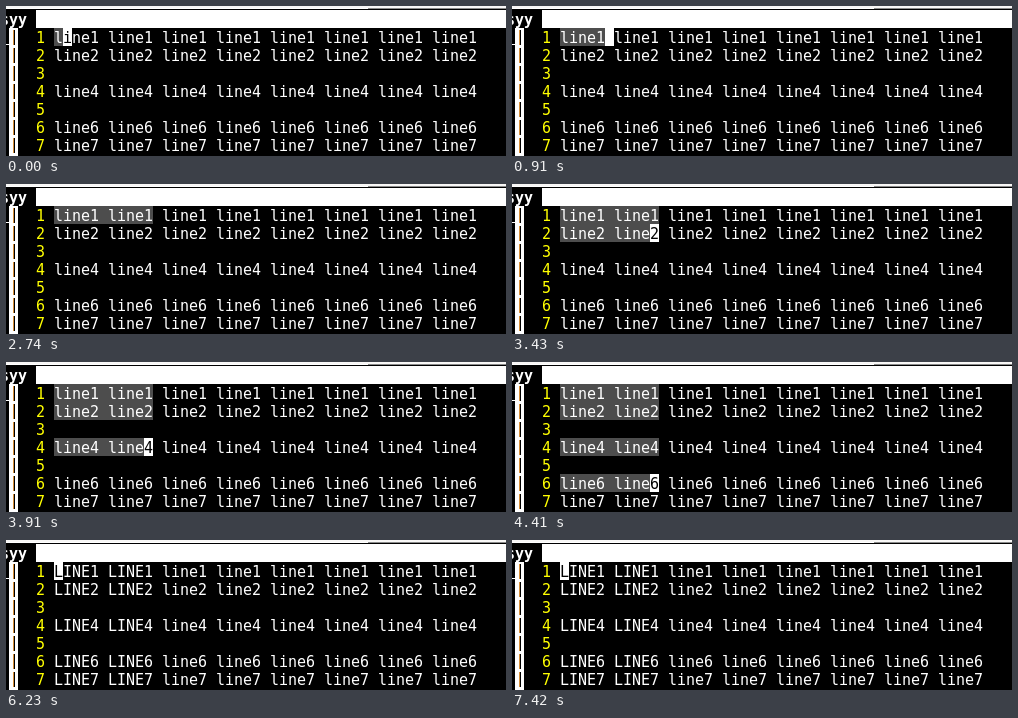
Recreate the animation shown at these times as an HTML page with a canvas. Size 500x150 px, loop 8000 ms.

```html
<!DOCTYPE html>
<html lang="en">
<head>
<meta charset="utf-8">
<title>Block selection</title>
<style>
  html, body { margin: 0; width: 100%; height: 100%; overflow: hidden; background: #000; }
  canvas { display: block; }
</style>
</head>
<body>
<canvas id="stage" width="500" height="150"></canvas>
<script>
const ctx = document.getElementById('stage').getContext('2d');
const LOOP = 8000;
const CW = 9, CH = 18, LEFT = 48, TOP = 22;
const WHITE = '#fff', BLACK = '#000', YELLOW = '#ff0', GREY = '#4d4d4d';
const FONT = '15px "DejaVu Sans Mono", monospace';
const blankRows = [2, 4];

// time, cursor row, cursor column, cursor visible
const moves = [
  [0, 0, 1, true], [130, 0, 2, true], [380, 0, 3, true], [630, 0, 4, true],
  [910, 0, 5, true], [1170, 0, 6, true], [1400, 0, 7, true], [1640, 0, 8, true],
  [1880, 0, 9, true], [2170, 0, 10, true], [2740, 0, 10, false], [3340, 0, 10, true],
  [3430, 1, 10, true], [3640, 2, 0, true], [3910, 3, 10, true], [4140, 4, 0, true],
  [4410, 5, 10, true], [4650, 6, 10, true], [5220, 6, 10, false],
  [6230, 0, 0, true], [6820, 0, 0, false], [7420, 0, 0, true]
];
const UPPER_AT = 6230;

function rect(x, y, w, h, color) {
  ctx.fillStyle = color;
  ctx.fillRect(x, y, w, h);
}

function glyph(ch, x, y, color) {
  ctx.fillStyle = color;
  ctx.fillText(ch, x, y + 15);
}

function lineText(row, upper) {
  if (blankRows.includes(row)) return '';
  const word = 'line' + (row + 1);
  const first = upper ? word.toUpperCase() : word;
  return Array.from({ length: 8 }, (_, i) => i < 2 ? first : word).join(' ');
}

function drawFrame() {
  rect(0, 0, 500, 150, BLACK);
  rect(0, 0, 500, 2, '#f8f7f6');
  rect(0, 2, 362, 1, WHITE);
  rect(362, 2, 138, 1, '#8a8a8a');
  rect(30, 4, 470, 18, WHITE);
  ctx.font = 'bold ' + FONT;
  [...'syy'].forEach((ch, i) => glyph(ch, -6 + i * CW, 4, WHITE));
  ctx.font = FONT;

  rect(3, TOP, CW, 128, WHITE);
  rect(0, 38, 3, 1, WHITE);
  for (let y = TOP; y < 150; y += CH) {
    rect(7, y + 2, 1, 15, '#d8913c');
    rect(8, y + 2, 1, 15, BLACK);
  }
}

function draw(time) {
  const [, row, col, shown] = moves.findLast(m => m[0] <= time);
  const upper = time >= UPPER_AT;
  drawFrame();

  for (let r = 0; r < 7; r++) {
    const y = TOP + r * CH;
    const text = lineText(r, upper);
    glyph(String(r + 1), 30, y, YELLOW);
    if (!upper && r <= row && text) rect(LEFT, y, (col + 1) * CW, CH, GREY);

    const cursorHere = shown && r === row;
    if (cursorHere) rect(LEFT + col * CW, y, CW, CH, WHITE);
    [...text].forEach((ch, c) =>
      glyph(ch, LEFT + c * CW, y, cursorHere && c === col ? BLACK : WHITE));
  }
}

function tick() {
  draw(performance.now() % LOOP);
  requestAnimationFrame(tick);
}
tick();
</script>
</body>
</html>
```
